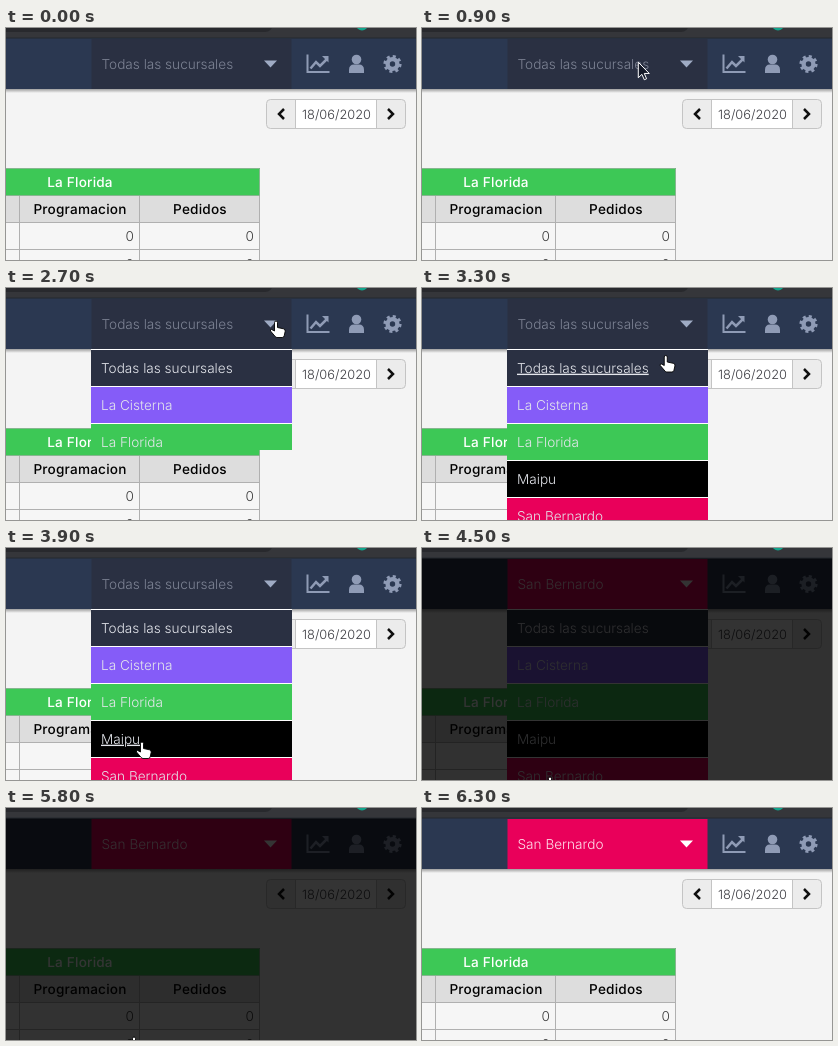
Write an HTML page that moves like this. It is 410 by 232 pixels and loops after 6.4 s.

```html
<!DOCTYPE html>
<html lang="es">
<head>
<meta charset="utf-8">
<title>Selector de sucursal</title>
<style>
html, body { margin: 0; width: 100%; height: 100%; overflow: hidden; background: #f4f4f4; }
svg { display: block; width: 100vw; height: 100vh; }
text { font: 300 13.6px Inter, "Open Sans", sans-serif; text-rendering: geometricPrecision; }
.head { font-weight: 450; letter-spacing: .2px; text-anchor: middle; }
.date { font-size: 12.8px; font-weight: 350; text-anchor: middle; }
.count { text-anchor: end; }
</style>
</head>
<body>
<svg id="stage" viewBox="0 0 410 232">
  <defs>
    <clipPath id="drop"><rect id="dropBox" x="84" y="61" width="203" height="0"/></clipPath>
    <linearGradient id="shadow" x2="0" y2="1">
      <stop stop-opacity=".35"/><stop offset="1" stop-opacity="0"/>
    </linearGradient>
  </defs>
</svg>
<script>
const LOOP = 6400, STEP = 100, ROW = 37, MENU_TOP = 61;
const NAVY = '#2a3042', RED = '#e9005a', GREEN = '#3dc856', STEEL = '#8f9bb5', LINE = '#b0b0b0';
const stage = document.getElementById('stage');
const dropBox = document.getElementById('dropBox');

function add(parent, tag, attrs) {
  const el = document.createElementNS('http://www.w3.org/2000/svg', tag);
  for (const k in attrs) el.setAttribute(k, attrs[k]);
  return parent.appendChild(el);
}

const rect = (p, x, y, width, height, fill, extra) => add(p, 'rect', { x, y, width, height, fill, ...extra });
const shape = (p, d, fill, extra) => add(p, 'path', { d, fill, ...extra });
const stroke = (p, d, color, width) => add(p, 'path', { d, fill: 'none', stroke: color, 'stroke-width': width });

function label(p, str, x, y, fill, cls = '') {
  const el = add(p, 'text', { x, y, fill, class: cls });
  el.textContent = str;
  return el;
}

function drawHeader() {
  rect(stage, 0, 10, 410, 51, '#2b3851');
  rect(stage, 0, 61, 410, 4, 'url(#shadow)');
  stroke(stage, 'M301.5 26.5V44H323.5', STEEL, 2);
  stroke(stage, 'M304.5 40.5l5.5-6.5 4 4 7-7', STEEL, 2.5);
  shape(stage, 'M316 28h6.5v6.5z', STEEL);
  add(stage, 'circle', { cx: 350.5, cy: 31.5, r: 4.8, fill: STEEL });
  shape(stage, 'M343 45v-3q0-5.5 5-5.5h5q5 0 5 5.5v3z', STEEL);
  const ring = (r, width, dash) => add(stage, 'circle', {
    cx: 386.5, cy: 36, r, fill: 'none', stroke: STEEL, 'stroke-width': width, 'stroke-dasharray': dash
  });
  ring(4.9, 4.4, 'none');
  ring(7.6, 3, `${7.6 * Math.PI / 8}`);
}

function drawDate() {
  const box = { rx: 4 };
  rect(stage, 260.5, 71.5, 139, 29, '#ececec', box);
  rect(stage, 290, 72, 81, 28, '#fff');
  rect(stage, 260.5, 71.5, 139, 29, 'none', { ...box, stroke: '#c4c4c4' });
  stroke(stage, 'M289.5 72v28M370.5 72v28', '#c4c4c4', 1);
  stroke(stage, 'M278 81l-5 5 5 5M382 81l5 5-5 5', '#0f0f0f', 2.5);
  label(stage, '18/06/2020', 330.5, 91, '#3c3c42', 'date');
}

function drawTable() {
  rect(stage, 0, 140, 254, 27, GREEN);
  rect(stage, 0, 167, 254, 27, '#ddd');
  rect(stage, 0, 194, 254, 38, '#f6f6f6');
  stroke(stage, 'M0 194.5H253M0 221.5H253M13.5 167V232M133.5 167V232M253.5 167V232', LINE, 1);
  stroke(stage, 'M0 140.5H253.5V167.5H0', '#86b68f', 1);
  label(stage, 'La Florida', 74, 158.5, '#fff', 'head');
  label(stage, 'Programacion', 74, 186, '#000', 'head');
  label(stage, 'Pedidos', 194, 186, '#000', 'head');
  for (const y of [213, 241])
    for (const x of [128, 248]) label(stage, '0', x, y, '#3c3c3c', 'count');
}

function drawSelect(text, back, ink, caret) {
  const g = add(stage, 'g', {});
  rect(g, 85.5, 11, 200, 50, back);
  label(g, text, 95.5, 41, ink);
  shape(g, 'M258 32.5h13l-6.5 7z', caret);
  return g;
}

function drawMenu() {
  const g = add(stage, 'g', { 'clip-path': 'url(#drop)' });
  const items = {
    'Todas las sucursales': NAVY, 'La Cisterna': '#855cf8', 'La Florida': GREEN, 'Maipu': '#000', 'San Bernardo': RED
  };
  return Object.entries(items).map(([text, back], i) => {
    const y = MENU_TOP + ROW * i;
    rect(g, 85, y, 201, 1, '#fff');
    rect(g, 85, y + 1, 201, ROW - 1, back);
    return label(g, text, 95, y + 23.7, '#e4e6ec');
  });
}

rect(stage, 0, 0, 410, 232, '#f4f4f4');
drawHeader();
drawDate();
drawTable();
const idle = drawSelect('Todas las sucursales', NAVY, '#7d8394', '#9fabc4');
const chosen = drawSelect('San Bernardo', RED, '#ffe1ec', '#fff');
const rows = drawMenu();
const veil = rect(stage, 0, 10, 410, 222, '#000');

// browser edge, never dimmed
rect(stage, 0, 0, 410, 10, '#35363a');
rect(stage, -20, -12, 287, 16, '#28292d', { rx: 8 });
rect(stage, 0, 9.5, 410, 1, '#24282f');
add(stage, 'circle', { cx: 356, cy: -3.5, r: 6, fill: '#12a58c' });

const arrow = shape(stage, 'M0 0V15.5l3.6-3.4 2.4 5.4 2.3-1-2.3-5.3h5z', '#151a28', { stroke: '#fff' });
const hand = shape(stage,
  'M-1.5 1.5a1.5 1.5 0 0 1 3 0V6.5l6 1.3q2 .5 1.7 2.5l-1 4.5q-.4 1.7-2 1.7H1q-1 0-1.8-1L-5.5 10q-.5-1.5 1-1.6l3 1.6z',
  '#fff', { stroke: '#000', 'stroke-width': 0.9 });

// pointer stops
const stops = [
  { t: 100, x: 290, y: -22 }, { t: 1000, x: 214, y: 36 }, { t: 1900, x: 214, y: 36 }, { t: 2500, x: 270, y: 33 },
  { t: 2900, x: 270, y: 33 }, { t: 3500, x: 235, y: 79 }, { t: 3900, x: 136, y: 194 }, { t: 4300, x: 128, y: 229 }
];

const swing = p => 0.5 - Math.cos(Math.PI * Math.min(1, Math.max(0, p))) / 2;

function pointerAt(t) {
  const next = stops.findIndex(s => s.t > t);
  if (next === 0) return stops[0];
  if (next < 0) return stops[stops.length - 1];
  const a = stops[next - 1], b = stops[next];
  const p = swing((t - a.t) / (b.t - a.t));
  return { x: a.x + (b.x - a.x) * p, y: a.y + (b.y - a.y) * p };
}

const show = (el, on) => el.setAttribute('display', on ? 'inline' : 'none');

function render(t) {
  const picked = t >= 4500;
  veil.setAttribute('opacity', picked ? 0.8 * (1 - swing((t - 5780) / 500)) : 0);
  show(idle, !picked);
  show(chosen, picked);

  const open = swing((t - 2500) / 400) - swing((t - 4600) / 400);
  dropBox.setAttribute('height', 202 * open);

  const { x, y } = pointerAt(t);
  const over = open > 0.95 ? Math.floor((y - MENU_TOP) / ROW) : -1;
  rows.forEach((row, i) => row.setAttribute('text-decoration', i === over ? 'underline' : 'none'));
  show(arrow, t < 2200);
  show(hand, t >= 2200 && t < 6000);
  for (const el of [arrow, hand]) el.setAttribute('transform', `translate(${x} ${y})`);
}

const start = performance.now();
function tick() {
  const t = performance.now() - start + 10;
  render(Math.floor(t / STEP) * STEP % LOOP);
  requestAnimationFrame(tick);
}
tick();
</script>
</body>
</html>
```
